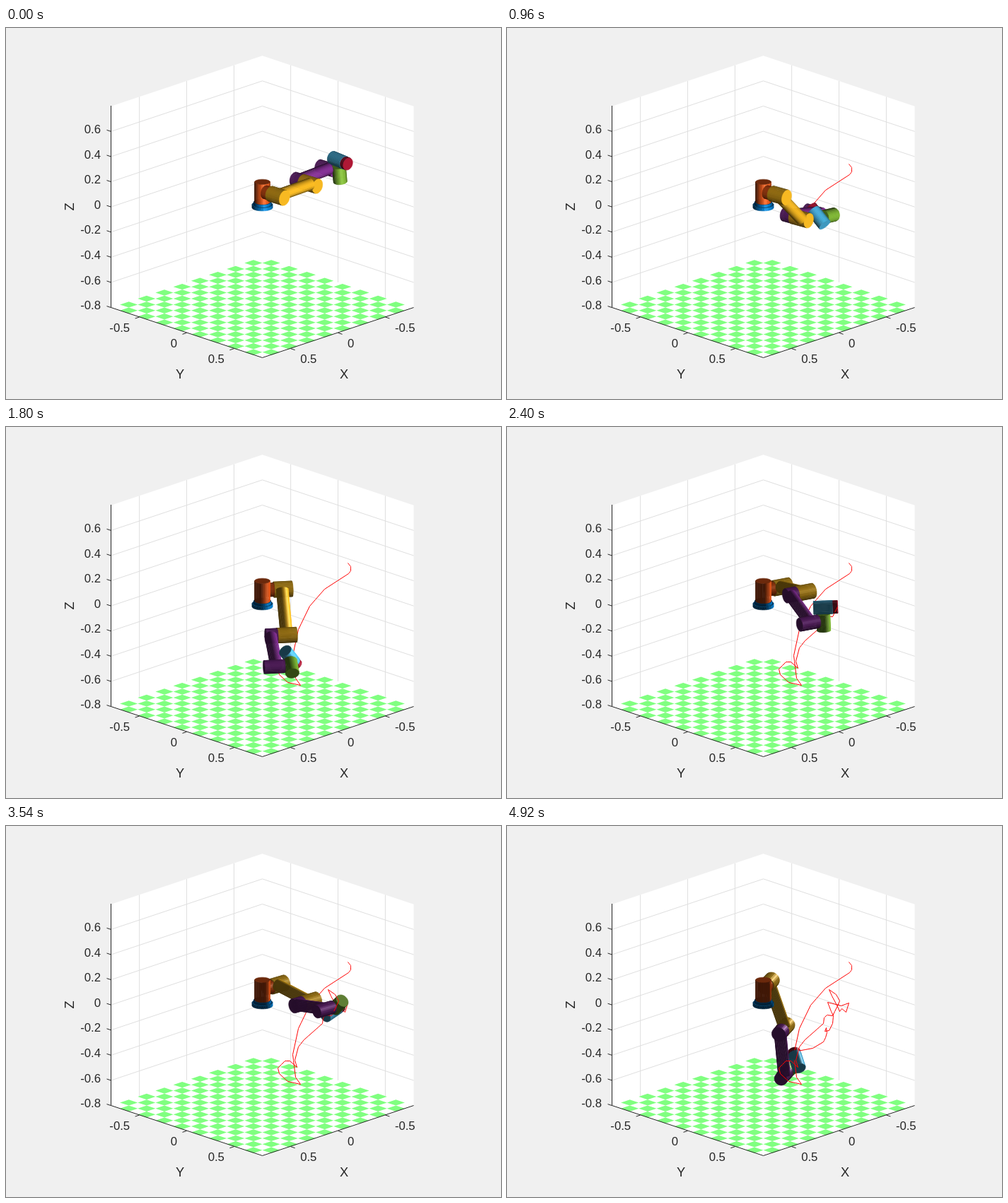
These frames come from a looping animation (700x525 px, 4.98 s). An HTML page with a canvas:

```html
<!DOCTYPE html>
<html lang="en">
<head>
<meta charset="utf-8">
<title>Robot arm trajectory</title>
<style>
html, body { margin: 0; width: 100%; height: 100%; overflow: hidden; background: #f0f0f0; }
canvas { display: block; }
</style>
</head>
<body>
<canvas id="stage" width="700" height="525"></canvas>
<script>
const ctx = document.getElementById('stage').getContext('2d');
const LOOP = 4980, HOLD = 240, STEP = 60, LAST = 79;
const BLUE = [0, 114, 189], ORANGE = [217, 83, 25], YELLOW = [237, 177, 32], PURPLE = [126, 47, 142],
  GREEN = [119, 172, 48], CYAN = [77, 190, 238], RED = [162, 20, 47];

// Step, trail vertex, then joint angles in degrees: base, shoulder, elbow, wrist, flange
const KEYS = [
  [0, 0, 90, 0, 0, 90, 0],
  [13, 5, 90, -43, 28, 178, 135],
  [27, 15.5, 145, -130, -28, 183, 55],
  [37, 25, 165, -189, 34, 245, -30],
  [56, 35, 180, -176, -16, 139, -5],
  [67, 40, 190, -133.5, -43.5, 202, 35],
  [79, 47, 207, -106, 16, 235, 30]
];

// Path of the tool tip on the stage
const TRAIL = `483,192 487,197 487,203 484,207 450,229 429,253 413,286 405,323 409,355 416,365 398,361 386,350
  384,342 394,332 401,332 411,341 408,331 413,312 421,302 438,287 447,279 448,271 452,267 460,268 463,262 467,254
  470,247 465,238 455,231 459,240 467,255 470,262 473,258 479,263 483,250 472,254 453,249 458,262 461,268 460,279
  455,289 449,290 451,285 452,292 450,299 447,305 432,314 405,319`
  .split(/\s+/).map(p => p.split(',').map(c => +c + .5));

// Vectors and projection
const VIEW = [.667, .667, .334], UP = [0, 0, 1];
const dot = (a, b) => a[0] * b[0] + a[1] * b[1] + a[2] * b[2];
const add = (p, d, s) => p.map((c, i) => c + d[i] * s);
const unit = a => a.map(c => c / Math.hypot(...a));
const cross = (a, b) => [a[1] * b[2] - a[2] * b[1], a[2] * b[0] - a[0] * b[2], a[0] * b[1] - a[1] * b[0]];
const project = ([x, y, z]) => [362.5 + 133.75 * (y - x), 253.2 + 44.7 * (x + y) - 178 * z];

function path(points, close) {
  ctx.beginPath();
  points.forEach(p => ctx.lineTo(...p));
  if (close) ctx.closePath();
}

function line(color, ...points) {
  path(points);
  ctx.strokeStyle = color;
  ctx.stroke();
}

// Arm kinematics
function chain([q, a1, a2, a3, b]) {
  const u = [Math.cos(q), Math.sin(q), 0];
  const inPlane = a => [-Math.sin(q) * Math.cos(a), Math.cos(q) * Math.cos(a), Math.sin(a)];
  const g = inPlane(a1 + a2 + a3), n = inPlane(a1 + a2 + a3 - Math.PI / 2);
  const h = add(u.map(c => c * Math.cos(b)), n, Math.sin(b));
  const shoulder = [0, 0, .125];
  const upper = add(shoulder, u, .15);
  const elbow = add(upper, inPlane(a1), .365);
  const fore = add(elbow, u, -.12);
  const wrist = add(fore, inPlane(a1 + a2), .335);
  const hand = add(wrist, u, .11);
  const tool = add(hand, g, .1);
  return { u, g, h, shoulder, upper, elbow, fore, wrist, hand, tool, tip: add(tool, h, .11) };
}

function keyValues(step) {
  const i = Math.max(1, KEYS.findIndex(k => k[0] >= step));
  const a = KEYS[i - 1], b = KEYS[i], f = (step - a[0]) / (b[0] - a[0]);
  return a.map((v, j) => v + (b[j] - v) * f);
}

function trailPoint(s) {
  const i = Math.min(Math.floor(s), TRAIL.length - 2), [a, b] = [TRAIL[i], TRAIL[i + 1]];
  return a.map((v, j) => v + (b[j] - v) * (s - i));
}

// Damped least squares: bend the joints, the outer ones most, until the tip meets the trail
function reach(pose, goal) {
  const weight = [.1, .2, .4, 1, 1], eps = 1e-3;
  for (let n = 0; n < 14; n++) {
    const at = project(chain(pose).tip), ex = goal[0] - at[0], ey = goal[1] - at[1];
    const jac = pose.map((_, j) => {
      const p = project(chain(pose.map((v, i) => v + (i === j ? eps : 0))).tip);
      return [(p[0] - at[0]) / eps, (p[1] - at[1]) / eps];
    });
    let xx = 60, yy = 60, xy = 0;
    jac.forEach(([x, y], j) => { xx += weight[j] * x * x; yy += weight[j] * y * y; xy += weight[j] * x * y; });
    const det = xx * yy - xy * xy, mx = (yy * ex - xy * ey) / det, my = (xx * ey - xy * ex) / det;
    pose = pose.map((v, j) => v + Math.max(-.15, Math.min(.15, weight[j] * (jac[j][0] * mx + jac[j][1] * my))));
  }
  return pose;
}

const steps = Array.from({ length: LAST + 1 }, (_, k) => {
  const [, vertex, ...angles] = keyValues(k);
  const pose = reach(angles.map(a => a * Math.PI / 180), trailPoint(vertex));
  return { vertex, base: pose[0], arm: chain(pose) };
});

function shade(color, normal, light) {
  const half = unit(add(light, VIEW, 1));
  const diffuse = .3 + .8 * Math.max(0, dot(normal, light));
  const shine = 110 * Math.max(0, dot(normal, half)) ** 24 * (dot(normal, light) > 0);
  return `rgb(${color.map(c => Math.min(255, Math.round(c * diffuse + shine)))})`;
}

function cylinder(color, a, b, r, light) {
  const axis = unit(add(b, a, -1)), sides = 28;
  const p = unit(cross(axis, Math.abs(axis[2]) < .9 ? UP : [1, 0, 0])), q = cross(axis, p);
  const around = i => {
    const t = i / sides * 2 * Math.PI;
    return add(p.map(c => c * Math.cos(t)), q, Math.sin(t));
  };
  const face = (points, normal) => {
    path(points.map(project), true);
    ctx.fillStyle = ctx.strokeStyle = shade(color, normal, light);
    ctx.fill();
    ctx.stroke();
  };
  ctx.lineWidth = .6;
  for (let i = 0; i < sides; i++) {
    const normal = around(i + .5), m = around(i), n = around(i + 1);
    if (dot(normal, VIEW) > -.05) face([add(a, m, r), add(a, n, r), add(b, n, r), add(b, m, r)], normal);
  }
  const side = Math.sign(dot(axis, VIEW));
  const rim = Array.from({ length: sides }, (_, i) => add(side > 0 ? b : a, around(i), r));
  face(rim, axis.map(c => c * side));
}

function drawArm(k) {
  const { arm, base } = steps[k], { u, g, h } = arm, items = [];
  const az = base - .3, light = [Math.cos(az) * .97, Math.sin(az) * .97, .24];
  const part = (color, a, b, r) => items.push({
    depth: (dot(a, VIEW) + dot(b, VIEW)) / 2,
    draw: () => cylinder(color, a, b, r, light)
  });
  const along = (color, p, d, from, to, r) => part(color, add(p, d, from), add(p, d, to), r);

  along(BLUE, [0, 0, 0], UP, -.005, .02, .076);
  along(BLUE, [0, 0, 0], UP, .02, .04, .064);
  along(ORANGE, [0, 0, 0], UP, .04, .199, .057);
  along(ORANGE, arm.shoulder, u, .03, .085, .05);
  along(YELLOW, arm.shoulder, u, .085, .225, .058);
  part(YELLOW, arm.upper, arm.elbow, .044);
  along(YELLOW, arm.elbow, u, -.075, .075, .056);
  along(PURPLE, arm.fore, u, -.038, .05, .054);
  part(PURPLE, arm.fore, arm.wrist, .044);
  along(PURPLE, arm.wrist, u, -.095, .06, .049);
  along(GREEN, arm.hand, g, -.08, .05, .05);
  along(CYAN, arm.tool, h, -.07, .075, .049);
  along(RED, arm.tool, h, .075, .11, .047);

  for (let i = 1; i <= k; i++) {
    const from = steps[i - 1].vertex, to = steps[i].vertex;
    const points = [trailPoint(from), ...TRAIL.slice(Math.floor(from) + 1, Math.ceil(to)), trailPoint(to)];
    items.push({
      depth: dot(steps[i].arm.tip, VIEW),
      draw: () => { ctx.lineWidth = 1; line('#f00', ...points); }
    });
  }
  items.sort((a, b) => a.depth - b.depth).forEach(item => item.draw());
}

// Axes box, floor and labels
function drawAxes() {
  const M = .8, TILES = 17, dark = '#262626', grid = '#dfdfdf';
  ctx.fillStyle = '#f0f0f0';
  ctx.fillRect(0, 0, 700, 525);
  path([[M, -M, M], [-M, -M, M], [-M, M, M], [-M, M, -M], [M, M, -M], [M, -M, -M]].map(project), true);
  ctx.fillStyle = '#fff';
  ctx.fill();

  ctx.lineWidth = 1;
  for (const v of [-.5, 0, .5]) {
    line(grid, project([v, -M, -M]), project([v, -M, M]));
    line(grid, project([-M, v, -M]), project([-M, v, M]));
  }
  for (let i = -3; i <= 3; i++) line(grid, ...[[M, -M], [-M, -M], [-M, M]].map(([x, y]) => project([x, y, i / 5])));

  ctx.fillStyle = '#80ff80';
  const size = 2 * M / TILES;
  for (let i = 0; i < TILES; i++) for (let j = 0; j < TILES; j++) {
    if ((i + j) % 2 === 0) continue;
    const x = i * size - M, y = j * size - M;
    path([[x, y, -M], [x + size, y, -M], [x + size, y + size, -M], [x, y + size, -M]].map(project), true);
    ctx.fill();
  }

  line(dark, [148.5, 110], [148.5, 395.5], [362.5, 466.5], [576.5, 395.5]);
  ctx.fillStyle = dark;
  ctx.textBaseline = 'middle';
  ctx.font = '16.7px "Liberation Sans", Arial, sans-serif';
  const tick = (point, dx, dy, text, tx, ty) => {
    const [x, y] = project(point);
    line(dark, [x, y], [x + dx, y + dy]);
    ctx.textAlign = dx < 0 ? 'right' : 'left';
    ctx.fillText(text, x + tx, y + ty);
  };
  for (let i = -4; i <= 3; i++) tick([M, -M, i / 5], -6, -2, String(i / 5), -14.5, -2);
  for (const v of [-.5, 0, .5]) {
    tick([M, v, -M], -6, 2, String(v), -13.5, 16);
    tick([v, M, -M], 6, 2, String(v), 13.5, 16);
  }
  ctx.font = '18.3px "Liberation Sans", Arial, sans-serif';
  ctx.textAlign = 'center';
  ctx.fillText('X', 478, 490.5);
  ctx.fillText('Y', 246, 490.5);
  ctx.save();
  ctx.translate(90, 253);
  ctx.rotate(-Math.PI / 2);
  ctx.fillText('Z', 0, 1);
  ctx.restore();
}

let shown = -1;
function frame() {
  const t = performance.now() % LOOP;
  const k = t < HOLD ? 0 : Math.min(LAST, Math.floor((t - HOLD) / STEP) + 1);
  if (k !== shown) {
    shown = k;
    ctx.lineJoin = 'round';
    drawAxes();
    drawArm(k);
  }
  requestAnimationFrame(frame);
}
frame();
</script>
</body>
</html>
```
